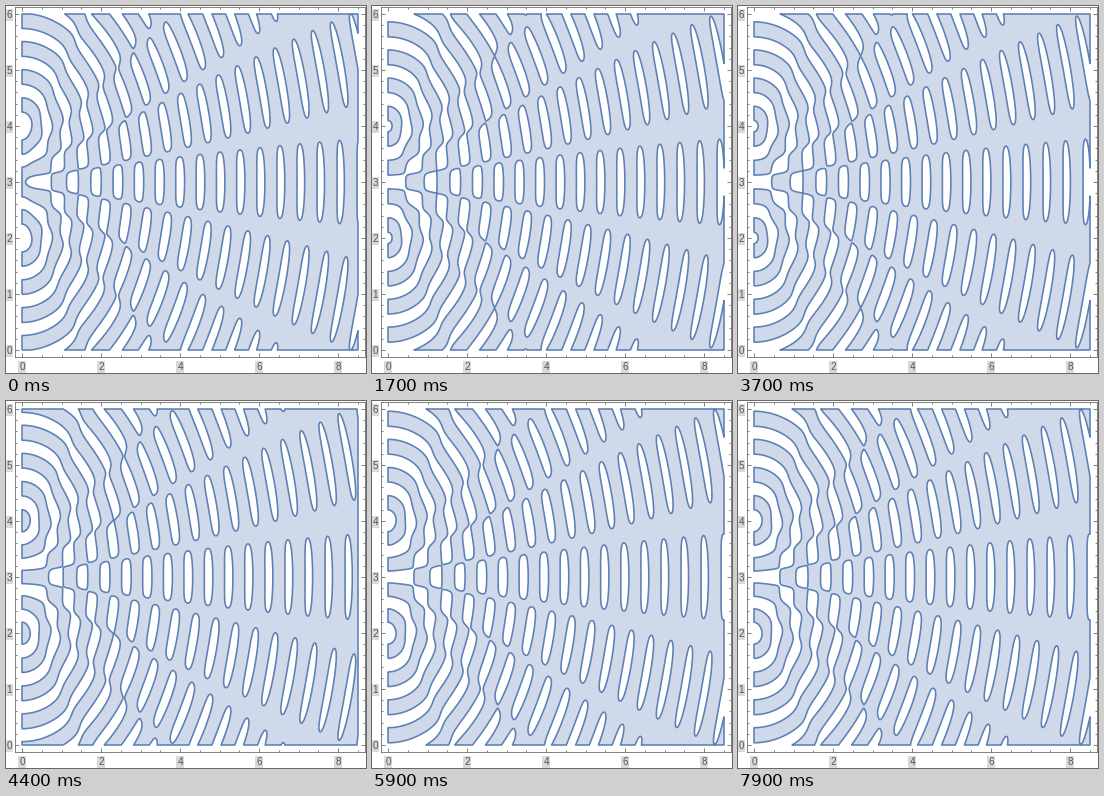
A matplotlib script for the animation above (8000 ms loop, 360x367 px).

```python
import numpy as np
import matplotlib.pyplot as plt
from matplotlib.animation import FuncAnimation
from matplotlib.ticker import MultipleLocator

W, H, DPI = 360, 367, 100
PX = 72 / DPI                      # points per pixel
XMAX, YMAX = 8.5, 6.0
LEFT, TOP, SIDE, PAD = 16, 8, 336, 0.02
K = 4 * np.pi                      # wavelength 0.5
LEVEL = 0.1
STEPS, LOOPS = 10, 8
LINE, FILL, FRAME = "#5e81b5", "#cfd9e9", "#666666"

plt.rcParams["font.family"] = "Liberation Sans"


def edged(end, n):
    """Even samples with one extra point just outside each end."""
    return np.r_[-1e-3, np.linspace(0, end, n), end + 1e-3]


xs, ys = edged(XMAX, 430), edged(YMAX, 400)
X, Y = np.meshgrid(xs, ys)
radii = [np.maximum(np.hypot(X, Y - y0), 1e-3) for y0 in (2, 4)]


def field(phase):
    z = sum(np.sin(K * r - phase) / r for r in radii)
    z[[0, -1], :] = 1e3            # closes the region along the border
    z[:, [0, -1]] = 1e3
    return z


fig = plt.figure(figsize=(W / DPI, H / DPI), dpi=DPI, facecolor="white")
margin = PAD * SIDE
box = SIDE + 2 * margin
ax = fig.add_axes([(LEFT - margin) / W, 1 - (TOP + SIDE + margin) / H,
                   box / W, box / H])
ax.set_xlim(-PAD * XMAX, (1 + PAD) * XMAX)
ax.set_ylim(-PAD * YMAX, (1 + PAD) * YMAX)
ax.autoscale(False)

for axis, major, minor in ((ax.xaxis, 2, 0.5), (ax.yaxis, 1, 0.2)):
    axis.set_major_locator(MultipleLocator(major))
    axis.set_minor_locator(MultipleLocator(minor))
    axis.set_major_formatter("{x:.0f}")
for which, size in (("major", 4), ("minor", 2.4)):
    ax.tick_params(which=which, direction="in", top=True, right=True,
                   length=size * PX, width=0.8 * PX, color=FRAME)
ax.tick_params(labelsize=10 * PX, labelcolor="#555555")
ax.tick_params(axis="x", pad=5 * PX)
ax.tick_params(axis="y", pad=3 * PX)
for spine in ax.spines.values():
    spine.set(color=FRAME, linewidth=0.8 * PX)
for label in ax.get_xticklabels() + ax.get_yticklabels():
    label.set_bbox(dict(boxstyle="square,pad=0.1", fc="#d9d9d9", ec="none"))

drawn = []


def update(i):
    while drawn:
        drawn.pop().remove()
    z = field(2 * np.pi * (i % STEPS) / STEPS)
    drawn.append(ax.contourf(X, Y, z, levels=[-1e9, LEVEL], colors=[FILL],
                             zorder=1))
    drawn.append(ax.contour(X, Y, z, levels=[LEVEL], colors=[LINE],
                            linewidths=1.6 * PX, linestyles="solid", zorder=2))
    return drawn


anim = FuncAnimation(fig, update, frames=STEPS * LOOPS, interval=100,
                     init_func=lambda: [], repeat=True, repeat_delay=0,
                     blit=False)
plt.show()
```
